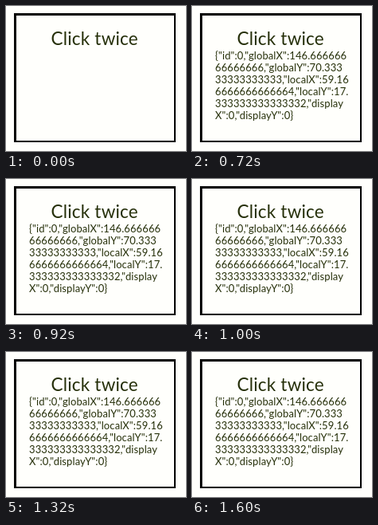
An HTML page that plays this animation: 226x182 px, repeating every 1.68 s.

```html
<!DOCTYPE html>
<html lang="en">
<head>
<meta charset="utf-8">
<title>Click twice</title>
<style>
html, body { margin: 0; width: 100%; height: 100%; overflow: hidden; background: #fffffc; }
svg { display: block; }
text { font-family: Lato, sans-serif; fill: #26300a; }
.title { font-size: 22.5px; letter-spacing: .2px; }
.event { font-size: 13px; letter-spacing: .1px; }
</style>
</head>
<body>
<svg width="226" height="182" viewBox="0 0 226 182">
  <path fill-rule="evenodd" d="M10 9H213V171H10ZM13 12H211V169H13Z"/>
  <text class="title" x="56.5" y="49">Click twice</text>
  <g id="event" class="event" visibility="hidden"></g>
</svg>
<script>
const LOOP = 1680, SHOW_AT = 720;
const LINE_TOP = 66.5, LINE_STEP = 15;
const group = document.getElementById('event');

const lines = [
  '{"id":0,"globalX":146.666666',
  '66666666,"globalY":70.333',
  '33333333333,"localX":59.16',
  '6666666666664,"localY":17.',
  '333333333333332,"display',
  'X":0,"displayY":0}'
];

lines.forEach((line, i) => {
  const text = document.createElementNS('http://www.w3.org/2000/svg', 'text');
  text.setAttribute('x', 29);
  text.setAttribute('y', LINE_TOP + i * LINE_STEP);
  text.textContent = line;
  group.append(text);
});

// The event details appear on the second click.
let start;
function draw(now) {
  start ??= now;
  const t = (now - start) % LOOP;
  group.setAttribute('visibility', t >= SHOW_AT ? 'visible' : 'hidden');
  requestAnimationFrame(draw);
}
requestAnimationFrame(draw);
</script>
</body>
</html>
```
